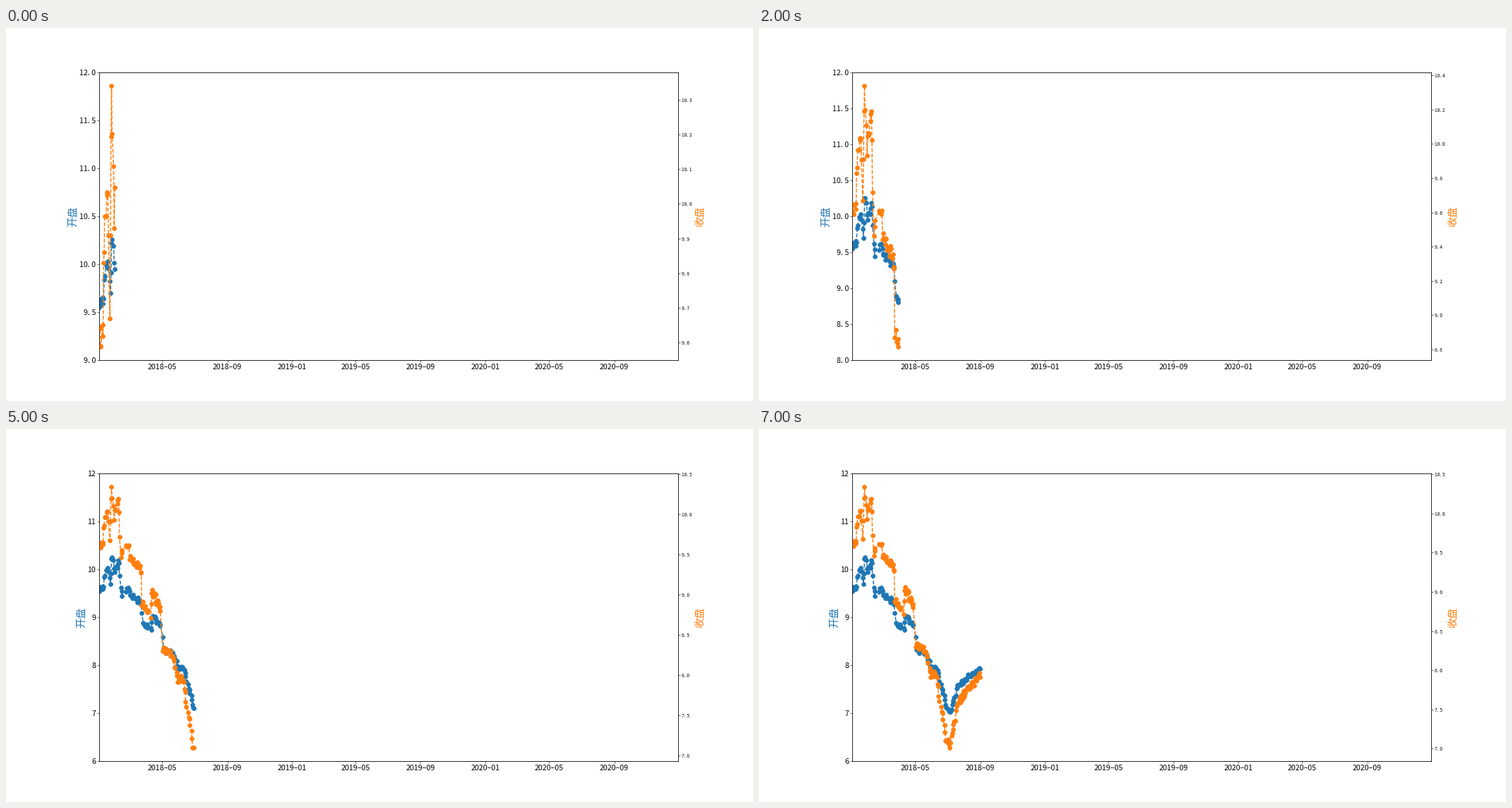
Animation of 1058 by 529 pixels, one loop 8000 ms. Source, as a matplotlib script:

```python
import math

import numpy as np
import matplotlib.pyplot as plt
from matplotlib.animation import FuncAnimation
from matplotlib.dates import MonthLocator, date2num, num2date
from matplotlib.ticker import FuncFormatter, MultipleLocator

plt.rcParams["font.family"] = ["Noto Sans CJK JP", "DejaVu Sans"]

MONTHS = 8
UPPER = 12
HOLIDAYS = np.r_[np.arange("2018-02-15", "2018-02-22", dtype="datetime64[D]"),
                 np.array(["2018-04-05", "2018-04-06", "2018-04-30",
                           "2018-05-01", "2018-06-18"], "datetime64[D]")]

# Main turns of the closing price
TURNS = {"01-02": 9.64, "01-04": 9.59, "01-09": 9.62, "01-10": 9.83,
         "01-18": 10.03, "01-22": 9.67, "01-25": 10.34, "01-30": 9.93,
         "02-07": 10.19, "02-12": 9.46, "02-27": 9.61, "02-28": 9.44,
         "03-22": 9.28, "03-23": 8.87, "04-09": 8.71, "04-11": 9.02,
         "04-27": 8.80, "05-02": 8.30, "05-21": 8.24, "05-30": 7.91,
         "06-08": 7.95, "06-27": 7.10, "07-05": 7.01, "07-20": 7.57,
         "08-31": 7.91}


def make_prices():
    rng = np.random.default_rng(4)
    days = np.arange("2018-01-02", "2018-09-01", dtype="datetime64[D]")
    days = days[np.is_busday(days, holidays=HOLIDAYS)]
    turn_days = np.array(["2018-" + d for d in TURNS], "datetime64[D]")
    at = np.searchsorted(days, turn_days)
    closes = np.interp(np.arange(len(days)), at, list(TURNS.values()))
    jitter = rng.uniform(-.02, .08, len(days))
    jitter[at] = 0
    closes += jitter

    # A day opens near the previous close, with a gap down before a fall
    falls = np.minimum(np.diff(closes), 0)
    noise = rng.uniform(-.03, .03, len(falls))
    opens = np.r_[9.55, closes[:-1] + .4 * falls + noise]
    return days, opens, closes


def spaced(value, decimals=1):
    """Number with a wide decimal point, close to half-width digits."""
    return f"{value:.{decimals}f}".replace(".", ".\u2005")


def month_label(value, _):
    return num2date(value).strftime("%Y-%m").replace("-", "\u2013")


days, opens, closes = make_prices()

fig, left = plt.subplots(figsize=(20, 10), dpi=52.9)
right = left.twinx()
style = dict(linestyle="--", marker="o", linewidth=2, markersize=8)
open_line, = left.plot([], [], color="C0", **style)
close_line, = right.plot([], [], color="C1", **style)

left.set_xlim(date2num(days[0]), date2num(np.datetime64("2020-12-31")))
left.xaxis.set_major_locator(MonthLocator(bymonth=(1, 5, 9)))
left.xaxis.set_major_formatter(FuncFormatter(month_label))
left.tick_params(labelsize=14.5)
right.tick_params(labelsize=9.1)
right.yaxis.set_major_formatter(FuncFormatter(lambda v, _: spaced(v)))
left.set_ylabel("开盘", color="C0", fontsize=20, labelpad=2)
right.set_ylabel("收盘", color="C1", fontsize=20, labelpad=6)


def update(frame):
    month_end = np.datetime64("2018-01") + frame + 1
    count = np.searchsorted(days, month_end.astype("datetime64[D]"))
    shown = date2num(days[:count])
    open_line.set_data(shown, opens[:count])
    close_line.set_data(shown, closes[:count])

    bottom, top = closes[:count].min(), closes[:count].max()
    margin = .05 * (top - bottom)
    right.set_ylim(bottom - margin, top + margin)

    lower = math.floor(bottom - .2)
    fine = UPPER - lower <= 4
    left.set_ylim(lower, UPPER)
    left.yaxis.set_major_locator(MultipleLocator(.5 if fine else 1))
    left.yaxis.set_major_formatter(
        FuncFormatter(lambda v, _: spaced(v, int(fine))))
    return open_line, close_line


anim = FuncAnimation(fig, update, frames=MONTHS, interval=1000,
                     repeat=True, repeat_delay=0, blit=False)
plt.show()
```
